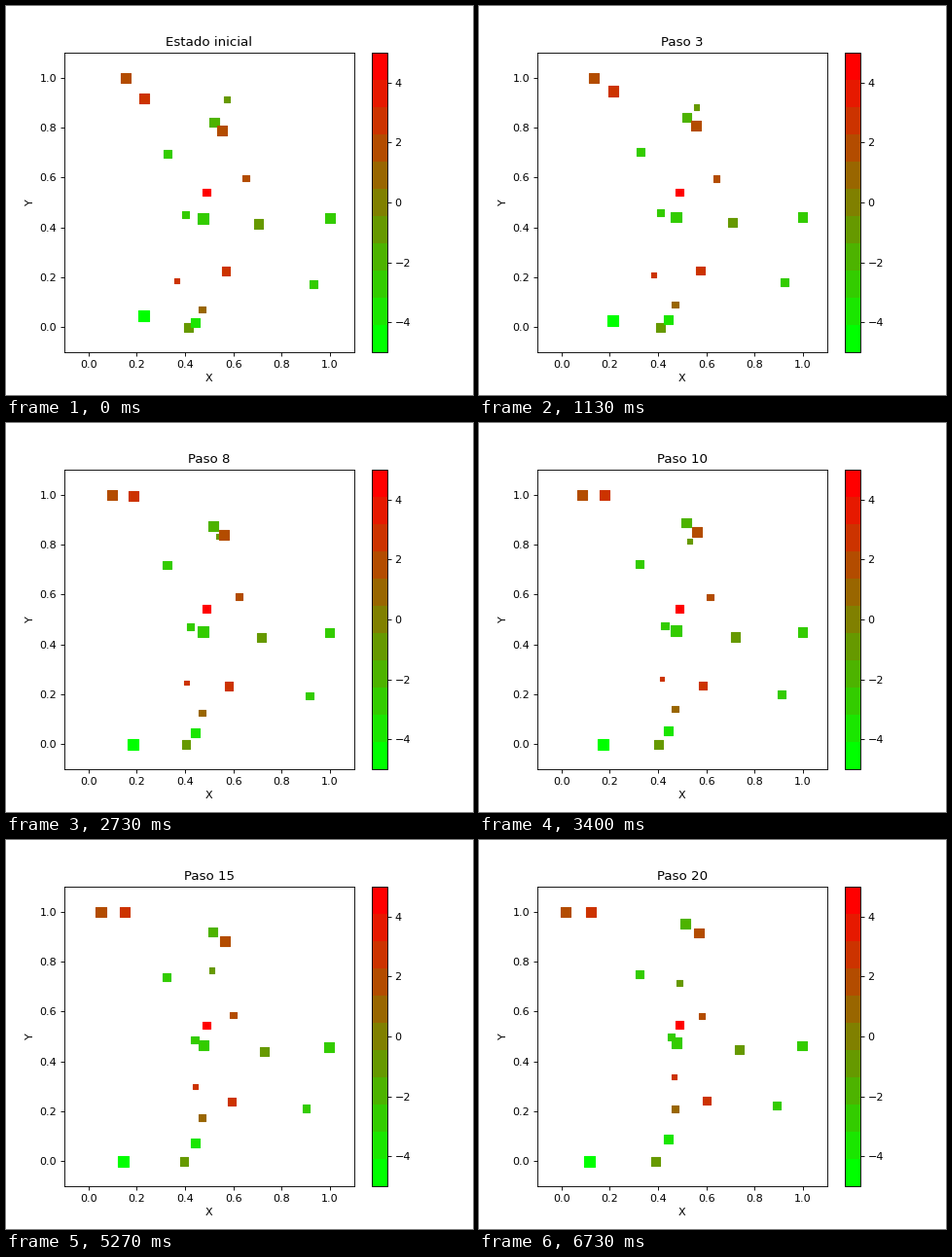
These frames come from a looping animation (480 by 400 pixels, 6.99 s). A matplotlib script:

```python
import numpy as np
import matplotlib.pyplot as plt
from matplotlib.animation import FuncAnimation
from matplotlib.colors import LinearSegmentedColormap

STEPS = 20
LOOP_MS = 6990
DPI = 80
PX = 72 / DPI  # points per pixel

# Start x, y, drift over the whole run and charge, lightest particle first
particles = np.array([
    (0.367, 0.186, 0.099, 0.152, 3),
    (0.572, 0.913, -0.082, -0.199, -1),
    (0.470, 0.071, 0, 0.139, 1),
    (0.653, 0.597, -0.072, -0.015, 2),
    (0.403, 0.451, 0.05, 0.047, -3),
    (0.488, 0.541, 0.001, 0.005, 5),
    (0.931, 0.174, -0.039, 0.05, -3),
    (0.328, 0.695, -0.006, 0.056, -3),
    (0.570, 0.225, 0.031, 0.019, 3),
    (0.414, 0, -0.024, 0, -1),
    (0.441, 0.018, 0.001, 0.072, -4),
    (0.704, 0.414, 0.032, 0.032, -1),
    (1, 0.437, -0.004, 0.026, -3),
    (0.520, 0.822, -0.006, 0.13, -2),
    (0.554, 0.788, 0.016, 0.127, 2),
    (0.231, 0.916, -0.108, 0.201, 3),
    (0.153, 1, -0.135, 0, 2),
    (0.474, 0.436, 0.003, 0.039, -3),
    (0.230, 0.045, -0.115, -0.13, -5),
])
start, drift, charge = particles[:, :2], particles[:, 2:4], particles[:, 4]
rank = np.linspace(0, 1, len(particles))
side = 4.7 + 6 * rank ** 0.6  # pixels, without the outline


def positions(step):
    """Constant velocity, stopped by the walls of the unit box."""
    return np.clip(start + drift * step / STEPS, 0, 1)


fig, ax = plt.subplots(figsize=(480 / DPI, 400 / DPI), dpi=DPI)
cmap = LinearSegmentedColormap.from_list("charge", [(0, 1, 0), (1, 0, 0)], N=11)
dots = ax.scatter(*start.T, s=(side * PX) ** 2, c=charge, marker="s",
                  cmap=cmap, vmin=-5, vmax=5)
fig.colorbar(dots, ax=ax)
ax.set(xlim=(-0.1, 1.1), ylim=(-0.1, 1.1), xlabel="X", ylabel="Y")
title = ax.set_title("Estado inicial")


def update(step):
    dots.set_offsets(positions(step))
    title.set_text(f"Paso {step}" if step else "Estado inicial")
    return dots, title


anim = FuncAnimation(fig, update, frames=STEPS + 1, init_func=lambda: update(0),
                     interval=LOOP_MS / (STEPS + 1), repeat=True, repeat_delay=0)
plt.show()
```
